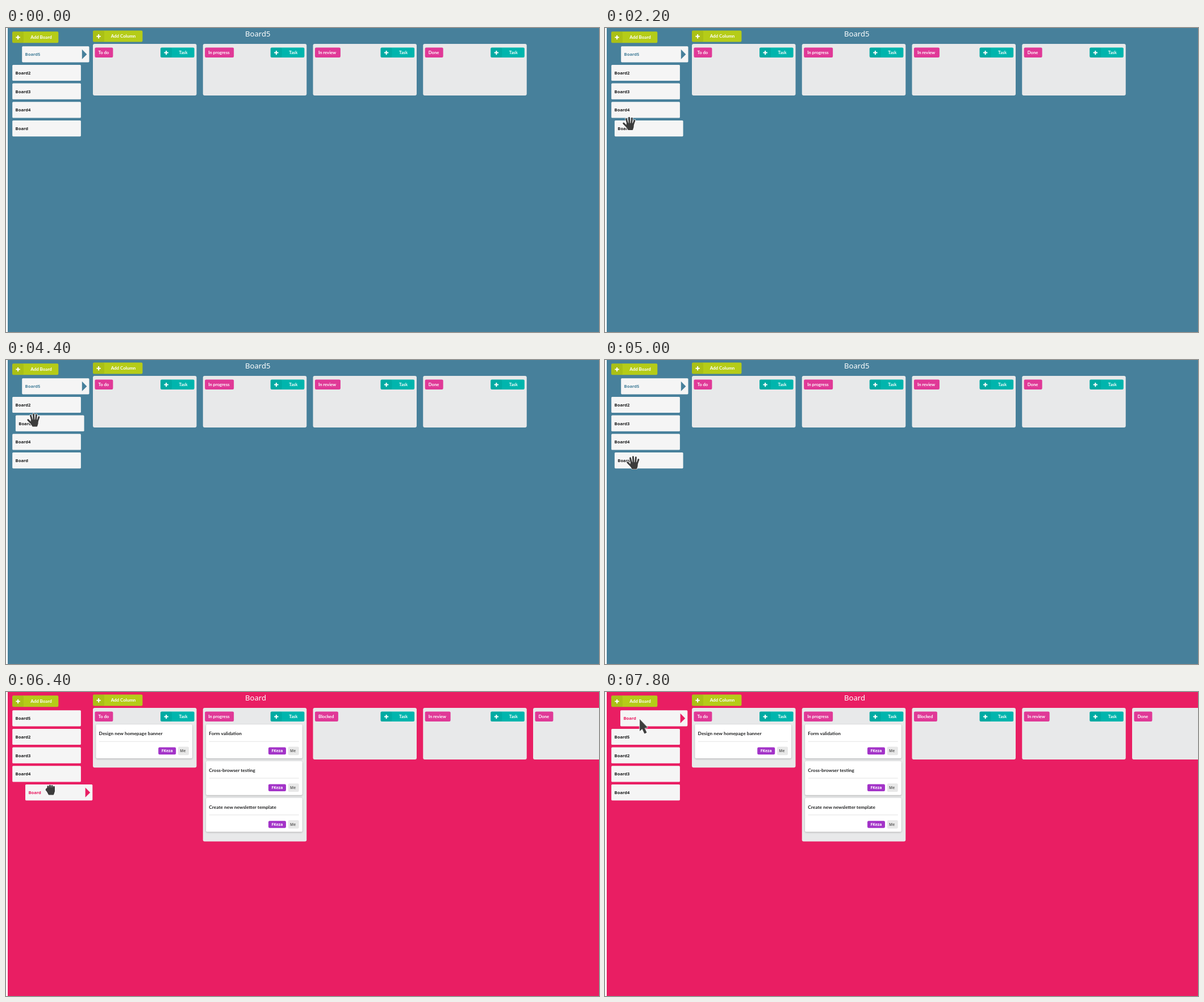
Animation of 1044 by 536 pixels, one loop 8 s. Source, as an HTML page:

```html
<!DOCTYPE html>
<html lang="en">
<head>
<meta charset="utf-8">
<title>Task boards</title>
<style>
  html, body { margin: 0; width: 100%; height: 100%; overflow: hidden; }
  svg { display: block; width: 1044px; height: 536px; background: #fff; }
  text { font: 700 7.65px Lato, sans-serif; fill: #fff; white-space: pre; }
  .button { font-size: 7.95px; }
  .mid { text-anchor: middle; }
  .title { font: 400 13.1px "Noto Sans", sans-serif; }
  .name { font: 700 7.6px "Noto Sans", sans-serif; fill: #1b1c1d; }
  .head { font-size: 8.36px; fill: #1f2021; }
  .tag { font: 700 6.9px "Noto Sans", sans-serif; text-anchor: middle; }
  .me { font-size: 6.6px; fill: #666; }
  .card { filter: drop-shadow(0 1px 1.5px rgba(0, 0, 0, .25)); }
</style>
</head>
<body>
<svg id="stage" viewBox="0 0 1044 536"></svg>
<script>
const LOOP = 8000;
const BLUE = '#47809b', PINK = '#e91e63';
const OLIVE = '#b5cc18', TEAL = '#00b5ad', ROSE = '#e03997', VIOLET = '#a333c8';
const ROW = 32.7, TOP = 32.2;
const stage = document.getElementById('stage');

function add(parent, tag, attrs = {}, text) {
  const node = document.createElementNS('http://www.w3.org/2000/svg', tag);
  for (const key in attrs) node.setAttribute(key, attrs[key]);
  if (text) node.textContent = text;
  return parent.appendChild(node);
}
const rect = (parent, x, y, width, height, fill, rx = 0) =>
  add(parent, 'rect', { x, y, width, height, fill, rx });
const label = (parent, x, y, text, cls = '') =>
  add(parent, 'text', { x, y, class: cls }, text);
const path = (parent, d, attrs) => add(parent, 'path', { d, ...attrs });
const move = (node, x, y) => node.setAttribute('transform', `translate(${x} ${y})`);

function plusButton(parent, x, y, w, h, color, text, textX, cls) {
  rect(parent, x, y, w, h, color, 2.2);
  rect(parent, x, y, 20, h, 'rgba(0,0,0,.06)', 2.2);
  path(parent, `M${x + 6.4} ${y + h / 2 + .4}h7.4m-3.7 -3.7v7.4`,
    { stroke: '#fff', 'stroke-width': 2, fill: 'none' });
  label(parent, textX, y + h / 2 + 2.6, text, 'mid ' + cls);
}

function card(parent, x, y, text) {
  rect(parent, x + 5.4, y, 169.6, 59.8, '#fff', 2.2).setAttribute('class', 'card');
  label(parent, x + 10.6, y + 19.2, text, 'head');
  rect(parent, x + 11, y + 29.6, 158, .8, '#dcdcdd');
  rect(parent, x + 115.2, y + 40.4, 31, 12.6, VIOLET, 2.2);
  label(parent, x + 130.7, y + 49.2, 'FKeza', 'tag');
  rect(parent, x + 150, y + 39.2, 19, 14.8, '#e8e8e8', 2.2);
  label(parent, x + 158.3, y + 49.2, 'Me', 'tag me');
}

function column(parent, index, name, width, tasks = []) {
  const x = 153 + 193.75 * index;
  const height = [91, 105.2, 0, 235.4][tasks.length];
  rect(parent, x, 28, 182.5, height, '#e8e9ea', 3);
  rect(parent, x + 3.4, 34.4, width, 17.6, ROSE, 2.2);
  label(parent, x + 9.5, 45.6, name);
  plusButton(parent, x + 119, 34.4, 59.6, 17.6, TEAL, 'Task', x + 159, '');
  tasks.forEach((task, i) => card(parent, x, 57.2 + 64.8 * i, task));
}

function scene(color, title, columns) {
  const g = add(stage, 'g');
  rect(g, 3, 0, 1041, 536, color);
  label(g, 421, 15, title, 'title');
  plusButton(g, 11, 6.2, 81.3, 20, OLIVE, 'Add Board', 62, 'button');
  plusButton(g, 153, 4.4, 87.4, 20, OLIVE, 'Add Column', 206.5, 'button');
  columns.forEach((c, i) => column(g, i, ...c));
  return g;
}

function item(parent, name, color) {
  const g = add(parent, 'g');
  rect(g, 0, 0, color ? 118.3 : 120.7, 28.2, '#f5f5f5', 1.6);
  label(g, 5.4, 17.1, name, 'name').style.fill = color || '';
  if (color) path(g, 'M105.6 5.6L114.2 14.2L105.6 22.8Z', { fill: color });
  return g;
}

const blue = scene(BLUE, 'Board5', [
  ['To do', 32], ['In progress', 51], ['In review', 45], ['Done', 32]
]);
const pink = scene(PINK, 'Board', [
  ['To do', 32, ['Design new homepage banner']],
  ['In progress', 51, ['Form validation', 'Cross-browser testing', 'Create new newsletter template']],
  ['Blocked', 41], ['In review', 45], ['Done', 32]
]);
const blueItems = ['Board5', 'Board2', 'Board3', 'Board4', 'Board']
  .map((name, i) => item(blue, name, i === 0 && BLUE));
const pinkItems = ['Board5', 'Board2', 'Board3', 'Board4', 'Board']
  .map((name, i) => item(pink, name, i === 4 && PINK));

function cursor(shapes) {
  const g = add(stage, 'g', { 'stroke-linecap': 'round', 'stroke-linejoin': 'round' });
  for (const [color, grow] of [['#fff', 1.4], ['#3c3c3c', 0]])
    for (const [d, width, fill] of shapes)
      path(g, d, { stroke: color, 'stroke-width': width + grow, fill: fill ? color : 'none' });
  return g;
}
const PALM = 'M-4.5 0L7 0L6.8 6L5.4 10.6L-2 10.6L-4.6 6Z';
const cursors = {
  open: cursor([
    ['M-3 1L-5.6 -8.2M0 0L-.6 -10.4M3.6 0L4.4 -9.4M6.4 2L9 -5.4', 2.9],
    ['M-4 6L-10.2 -.4', 3],
    [PALM, 1.6, true]
  ]),
  closed: cursor([
    ['M-4 -1V-5.4M-.6 -2V-7M3 -2V-6.6M6.4 0V-4.8', 3],
    ['M-4 4L-7 .6L-6.4 -1', 2.8],
    ['M-5 -3L7.2 -3L7.2 3L5.4 8.6L-2.6 8.6L-5 4Z', 1.6, true]
  ]),
  arrow: cursor([['M.4 .8V20.6L4.6 16.8L8.6 25.2L12.2 23.4L8.4 15.4L13.6 14.6Z', .6, true]])
};

// time, kind, x, y
const pointer = [
  [0, '', 0, 0],
  [600, 'arrow', 108, 2], [800, 'open', 84, 40], [1000, 'open', 68, 57],
  [1200, 'open', 58, 76], [1400, 'open', 52, 90], [1600, 'open', 49, 106],
  [1800, 'open', 47, 121], [2000, 'open', 45, 145], [2200, 'open', 43, 168.5],
  [2400, 'open', 44, 178], [2600, 'open', 46, 170], [2800, 'open', 48, 156.5],
  [3000, 'open', 49, 148], [3200, 'open', 50, 137], [3400, 'open', 51, 121],
  [3600, 'open', 51, 106], [3800, 'open', 51, 89], [4000, 'open', 51, 73],
  [4200, 'open', 50, 84], [4400, 'open', 49, 106], [4600, 'open', 49, 134],
  [4800, 'open', 49, 166], [5000, 'open', 50, 181], [5600, 'open', 48, 181],
  [6000, 'open', 62, 189], [6200, 'open', 76, 175], [6400, 'closed', 78, 172],
  [6600, 'closed', 78, 160], [6800, 'closed', 77, 134], [7000, 'closed', 77, 111],
  [7200, 'closed', 77, 84], [7400, 'closed', 76, 58], [7600, 'closed', 73, 44],
  [7800, 'arrow', 61, 48]
];

// time, dragged x, dragged y, then how far each other row has slid down
const drag = [
  [5600, 34, 163, 0, 0, 0, 0],
  [6600, 34, 151, 0, 0, 0, 0],
  [6800, 33, 125, 0, 0, 0, .55],
  [7000, 33, 102, 0, 0, .32, 1],
  [7200, 33, 75, 0, .3, 1, 1],
  [7400, 32, 49, .3, 1, 1, 1],
  [7600, 29, 35, 1, 1, 1, 1],
  [7800, 27, 32.2, 1, 1, 1, 1]
];

const at = (table, t) => table.filter(step => step[0] <= t).pop();
const rowY = i => TOP + ROW * i;
const over = (i, y) => y >= rowY(i) && y < rowY(i) + 28.6;

function draw(t) {
  const [, kind, px, py] = at(pointer, t);
  for (const name in cursors) {
    cursors[name].style.display = name === kind ? '' : 'none';
    move(cursors[name], px, py);
  }
  const second = t >= 5600;
  blue.style.display = second ? 'none' : '';
  pink.style.display = second ? '' : 'none';
  if (second) {
    const [, x, y, ...slides] = at(drag, t);
    slides.forEach((s, i) => move(pinkItems[i], 11.2, rowY(i + s)));
    move(pinkItems[4], x, y);
  } else {
    blueItems.forEach((node, i) => {
      const shift = kind === 'open' && over(i, py) ? 5.7 : 0;
      move(node, (i ? 11.2 : 28.2) + shift, rowY(i));
    });
  }
}

const start = performance.now();
function tick() {
  draw((performance.now() - start) % LOOP);
  requestAnimationFrame(tick);
}
tick();
</script>
</body>
</html>
```
